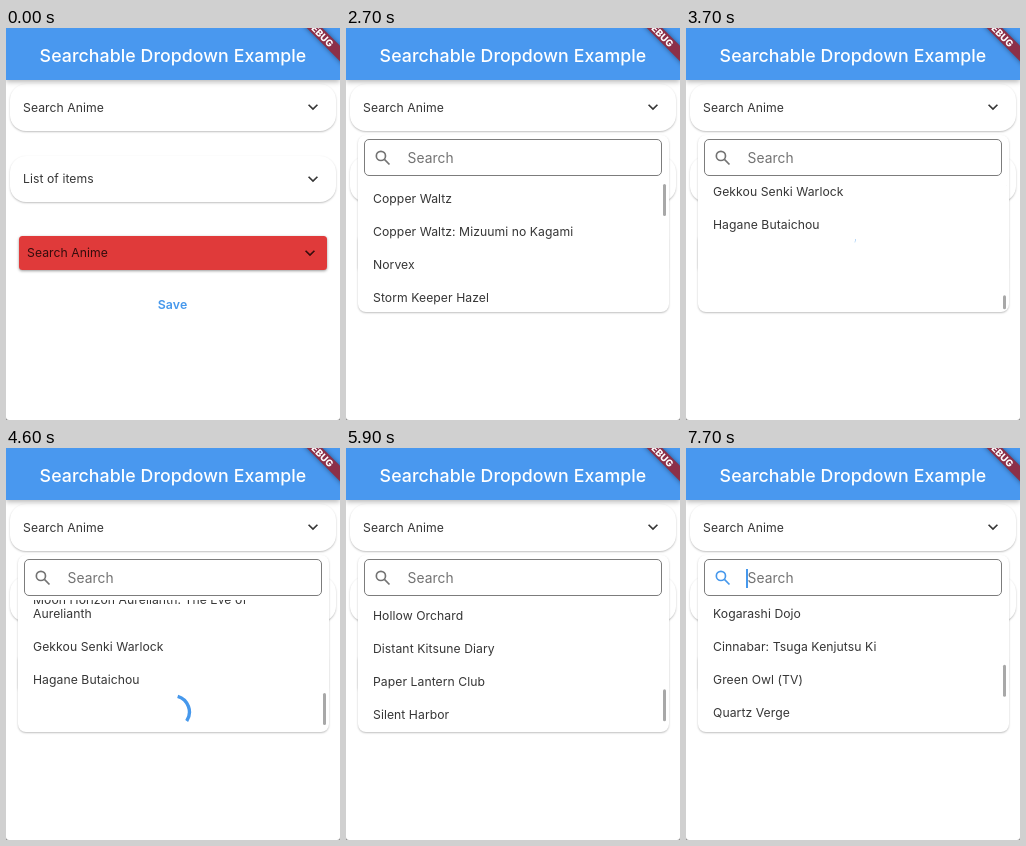
Write an HTML page that moves like this. It is 334 px wide and 392 px high and loops after 8000 ms.

```html
<!DOCTYPE html>
<html lang="en">
<head>
<meta charset="utf-8">
<title>Searchable dropdown</title>
<style>
  html, body { margin: 0; width: 100%; height: 100%; overflow: hidden; background: #8a8a8a; }
  #stage {
    --blue: #4698ec;
    position: relative; width: 334px; height: 392px; overflow: hidden;
    background: #fff; border-radius: 0 0 3px 3px;
    font: 12.2px/20px Inter, Roboto, sans-serif; letter-spacing: .06px; color: #363636;
  }
  #stage div, #stage svg, #stage ul { position: absolute; box-sizing: border-box; }
  ul { margin: 0; padding: 0; list-style: none; }

  .bar { inset: 0 0 auto; height: 52px; background: #4998ef; box-shadow: 0 2px 5px rgba(0,0,0,.28); }
  .bar div { width: 100%; top: 17.6px; text-align: center; color: #fff; font-size: 17.75px; font-weight: 500; }
  .banner {
    left: 274px; top: -.5px; width: 80px; height: 11px; transform: rotate(45deg);
    background: #8c3049; color: #fff; font-size: 9.5px; line-height: 11px; font-weight: 800;
    text-align: center; box-shadow: 0 0 5px rgba(0,0,0,.45);
  }
  .field { left: 3.5px; width: 326.5px; height: 46.5px; border-radius: 16px; background: #fff;
    box-shadow: 0 1px 2px rgba(0,0,0,.25); }
  .field div { left: 13.5px; top: 13.5px; }
  .field svg { left: 293.6px; top: 13.2px; }
  .red { left: 13px; top: 208px; width: 308px; height: 34px; border-radius: 3.5px;
    background: #e03a3a; color: #350d0d; box-shadow: 0 1px 3px rgba(0,0,0,.4); }
  .red div { left: 8px; top: 7.3px; }
  .red svg { left: 281.2px; top: 7.2px; }
  .save { width: 333px; top: 267px; text-align: center; color: var(--blue);
    font-size: 12.3px; font-weight: 600; letter-spacing: .15px; }

  #menu { left: 12px; top: 107px; width: 310.5px; height: 177px; border-radius: 8px; background: #fff;
    box-shadow: 0 1px 2px rgba(0,0,0,.25); }
  .search { left: 6px; top: 4px; width: 298px; height: 37px; border: 1px solid #7c7c7c; border-radius: 5px;
    font-size: 13.8px; color: #737373; }
  .search svg { left: 8.3px; top: 7.7px; }
  .search div { left: 42.5px; top: 7.8px; }
  .search .caret { left: 41px; top: 9px; width: 2px; height: 19px; background: var(--blue); visibility: hidden; }
  .focus svg { color: var(--blue); }
  .focus .caret { visibility: visible; }
  .list { left: 0; top: 45px; width: 310.5px; height: 132px; overflow: hidden; border-radius: 0 0 8px 8px; }
  #items { left: 15px; top: 2px; }
  #items li { padding: 9.5px 0; line-height: 14px; white-space: pre; }
  #spinner { left: 135px; top: 0; }
  #thumb { left: 305px; top: 0; width: 3px; border-radius: 1.5px; background: #a8a8a8; }
</style>
</head>
<body>
<div id="stage">
  <div class="field" style="top:56px"><div>Search Anime</div></div>
  <div class="field" style="top:127.5px"><div>List of items</div></div>
  <div class="red"><div>Search Anime</div></div>
  <div class="save">Save</div>

  <div id="menu">
    <div class="search" id="search">
      <svg width="20" height="20" viewBox="0 0 24 24" fill="none" stroke="currentColor" stroke-width="2">
        <circle cx="9.5" cy="9.5" r="5.5"/><path d="M13.7 13.7L19.8 19.8"/>
      </svg>
      <div>Search</div>
      <div class="caret"></div>
    </div>
    <div class="list">
      <ul id="items"></ul>
      <svg id="spinner" width="40" height="40" viewBox="-20 -20 40 40">
        <path id="arc" fill="none" stroke="#4698ec" stroke-width="3.4"/>
      </svg>
      <div id="thumb"></div>
    </div>
  </div>

  <div class="bar"><div>Searchable Dropdown Example</div></div>
  <div class="banner">DEBUG</div>
</div>

<script>
const $ = id => document.getElementById(id);
const clamp = x => Math.min(1, Math.max(0, x));
const LOOP = 8000, OPEN = 1400, READY = 2500, PAGE2 = 4900, PAGE3 = 7100;
const LOAD2 = 3670, LOAD3 = 6390;

for (const box of document.querySelectorAll('.field, .red'))
  box.insertAdjacentHTML('beforeend',
    `<svg width="20" height="20" viewBox="0 0 24 24" fill="none" stroke="currentColor"
      stroke-width="2"><path d="M6.7 9.3L12 14.6L17.3 9.3"/></svg>`);

// Titles by list position; the rest only pass by while scrolling.
const titles = {
  0: ['Copper Waltz', 'Copper Waltz: Mizuumi no Kagami', 'Norvex', 'Storm Keeper Hazel'],
  21: ['Moon Horizon Aurelianth: Dusk and\nDaybreak', 'Moon Horizon Aurelianth: The Eve of\nAurelianth',
    'Gekkou Senki Warlock', 'Hagane Butaichou'],
  33: ['Madou Senshi Crystal Plaza', 'Ao Kiri Tsuyu', 'Plumstone (Movie)', 'Orb the Elk'],
  40: ['Tsukikage Yamabushi Chronicle:\nHarukaze-hen', 'Tsukikage Yamabushi Chronicle: Song\nof the Pines'],
  47: ['Kogarashi Dojo', 'Cinnabar: Tsuga Kenjutsu Ki', 'Green Owl (TV)', 'Quartz Verge'],
};
const first = ['Amber', 'Hollow', 'Distant', 'Paper', 'Silent', 'Seventh', 'Marble'];
const second = ['Lantern Club', 'Harbor', 'Sky Report', 'Orchard', 'Kitsune Diary'];
const names = Array.from({ length: 51 }, (_, i) => `${first[i % 7]} ${second[i % 5]}`);
for (const [at, group] of Object.entries(titles)) group.forEach((name, i) => names[+at + i] = name);
const rows = names.map(name => {
  const li = document.createElement('li');
  li.textContent = name;
  $('items').append(li);
  return li;
});

// cubic-bezier(.4, 0, .2, 1)
function fastOutSlowIn(x) {
  let lo = 0, hi = 1;
  for (let i = 0; i < 20; i++) {
    const s = (lo + hi) / 2, r = 1 - s;
    if (1.2 * r * r * s + .6 * r * s * s + s ** 3 < x) lo = s; else hi = s;
  }
  return 3 * (1 - lo) * lo * lo + lo ** 3;
}

function drawSpinner(age, y) {
  const p = age / 1333 % 1;
  const head = fastOutSlowIn(clamp(p * 2)), tail = fastOutSlowIn(clamp(p * 2 - 1));
  const start = Math.PI * (-.5 + 1.5 * tail + 2 * (age / 2222 % 1) + .5 * p);
  const sweep = Math.max(.001, 1.5 * Math.PI * (head - tail));
  const point = a => `${16.4 * Math.cos(a)} ${16.4 * Math.sin(a)}`;
  $('arc').setAttribute('d', `M${point(start)}A16.4 16.4 0 ${+(sweep > Math.PI)} 1 ${point(start + sweep)}`);
  $('spinner').style.transform = `translateY(${y - 20}px)`;
}

const END1 = 759, END2 = 1612;
const easeOut = (t, from, to, power) => 1 - (1 - clamp((t - from) / (to - from))) ** power;

function scrollAt(t) {
  if (t < 3700) return 794 * easeOut(t, 3150, 3700, 1.4);
  if (t < 5250) return 794 - 35 * easeOut(t, 3700, 4250, 3);
  if (t < 6390) return END1 + 855 * easeOut(t, 5250, 6390, 2.18);
  return END2 + 2 - 2 * easeOut(t, 6390, 6700, 3);
}

function scrollEnd(t) {
  return t < 4000 ? END1 : t < PAGE2 ? 793 : t < PAGE3 ? END2 : 2470;
}

function render(t) {
  const scroll = scrollAt(t), end = scrollEnd(t);
  const show = (el, on) => el.style.visibility = on ? 'inherit' : 'hidden';

  $('menu').style.visibility = t >= OPEN ? 'visible' : 'hidden';
  $('menu').style.opacity = clamp((t - OPEN + 50) / 150);
  $('search').classList.toggle('focus', t >= 7700);

  const count = t < READY ? 0 : t < PAGE2 ? 25 : t < PAGE3 ? 50 : 51;
  rows.forEach((row, i) => show(row, i < count));
  $('items').style.transform = `translateY(${-scroll}px)`;

  const opening = t < READY;
  const loading = t >= LOAD2 && t < PAGE2 || t >= LOAD3 && t < PAGE3;
  show($('spinner'), opening || loading);
  if (opening) drawSpinner(Math.max(0, t - OPEN + 40), 66);
  else if (t < PAGE2) drawSpinner(Math.max(0, t - LOAD2), 112 + END1 - scroll);
  else drawSpinner(Math.max(0, t - LOAD3), 112 + END2 - scroll);

  const squash = Math.max(0, scroll - end) * .52;
  show($('thumb'), t >= 2700);
  $('thumb').style.height = `${32 - squash}px`;
  $('thumb').style.transform = `translateY(${4 + 93 * Math.min(1, scroll / end) + squash}px)`;
}

const began = performance.now();
function tick() {
  const t = (performance.now() - began) % LOOP;
  render(Math.floor(t / 100) * 100);
  requestAnimationFrame(tick);
}
tick();
</script>
</body>
</html>
```
